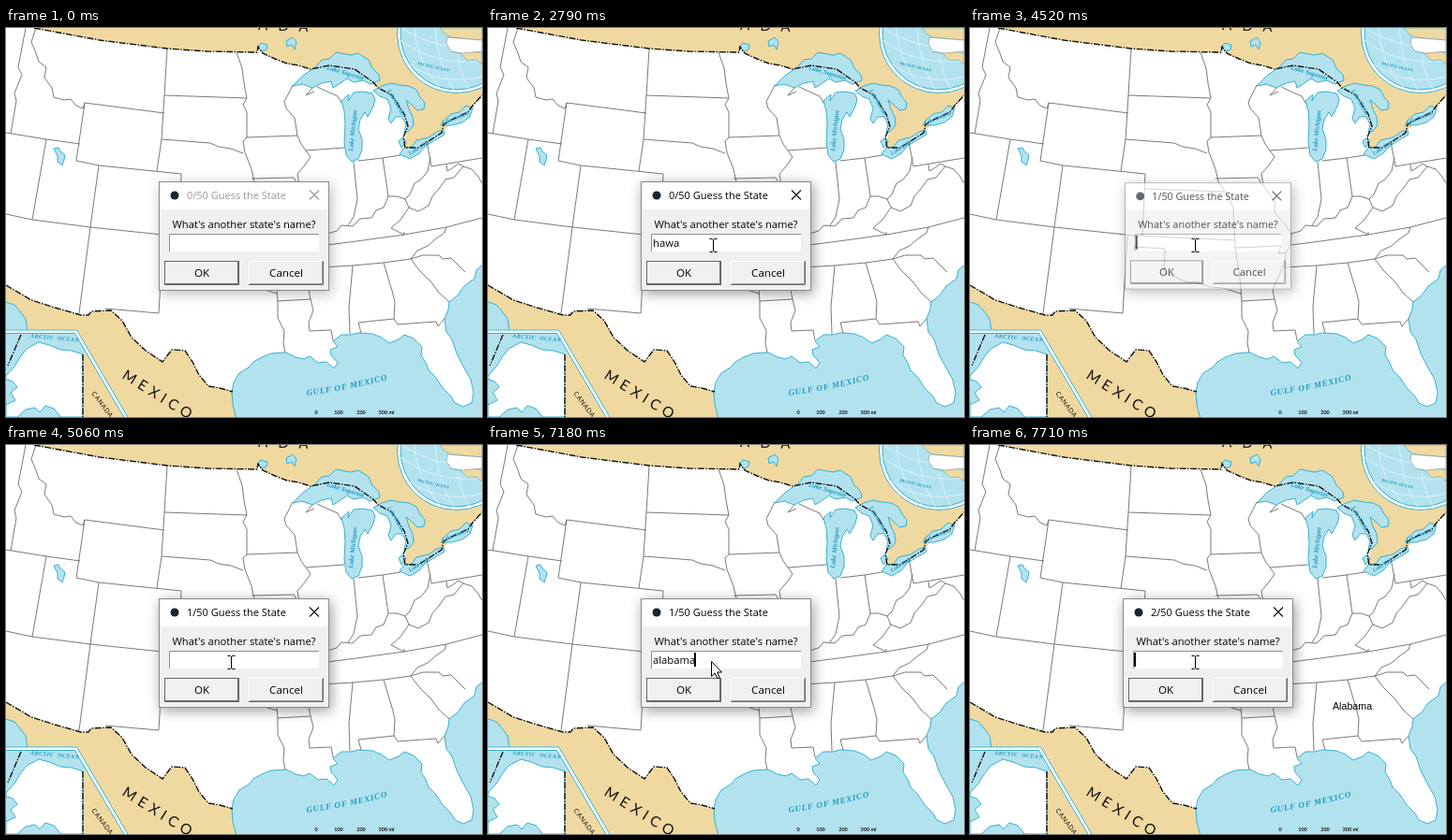
These frames come from a looping animation (508 by 416 pixels, 8000 ms). An HTML page:

```html
<!DOCTYPE html>
<html lang="en">
<head>
<meta charset="utf-8">
<title>Guess the State</title>
<style>
html, body { margin: 0; width: 100%; height: 100%; overflow: hidden; background: #fff; }
svg { display: block; }
.tan { fill: #f0d9a0; }
.sea { fill: #b3e2ef; stroke: #35b0cf; stroke-width: 1; stroke-linejoin: round; }
.line { fill: none; stroke: #6a6a6a; stroke-width: .9; stroke-linejoin: round; }
.border { fill: none; stroke: #111; stroke-width: 1.4; stroke-dasharray: 7 1.5 1.5 1.5; }
.frame { fill: none; stroke: #35b0cf; stroke-width: 1; }
.water { font: italic bold 6px "Liberation Serif", serif; fill: #1a9cc0; }
.place { font-family: Lato, sans-serif; fill: #111; }
.ui { font-family: "Open Sans", "Noto Sans", sans-serif; fill: #000; }
</style>
</head>
<body>
<svg width="508" height="416" viewBox="0 0 508 416">
  <rect width="508" height="416" fill="#fff"/>

  <!-- neighbours -->
  <path class="tan" d="M30 0 100 13 172 22 215 25 268 26 269 20 274 27 287 33 300 38 312 40 325 44 345 40 372 44 392 60 412 72 425 92 429 105 424 128 440 128 465 112 478 98 493 90 508 72V0Z"/>
  <path class="tan" d="M0 275 27 291 52 299 80 307 88 307 91 303 112 302 124 313 134 331 149 345 167 357 177 344 191 345 199 357 206 371 216 383 228 385 242 389 250 418H0Z"/>

  <!-- seas and lakes -->
  <path class="sea" d="M0 293 9 296 15 303 21 311 23 325H-2V293Z"/>
  <path class="sea" d="M246 418 242 403 241 389 243 379 249 369 259 363 264 357 273 352 283 348 299 347 309 352 318 354 324 351 333 358 342 357 350 364 354 358 347 350 346 344 354 341 349 335 358 328 368 328 376 326 391 327 401 331 409 337 419 333 425 328 435 332 444 341 443 350 448 358 451 366 459 374 466 385 475 394 479 401 488 405 497 401 499 390 496 376 487 360 481 348 476 333 470 325 468 311 472 301 473 293 482 286 489 276 500 268 502 259 510 252V418Z"/>
  <path class="sea" d="M306 62 318 50 330 42 337 34 345 33 352 26 368 29 376 27 387 34 391 43 398 50 399 56 389 60 381 56 371 58 364 54 354 61 349 64 347 57 337 59 327 64 316 60Z"/>
  <path class="sea" d="M358 78 361 89 362 104 361 122 363 136 369 143 376 140 380 130 380 119 376 108 378 98 383 90 386 95 392 84 394 76 391 70 381 68 371 69 365 78 366 71Z"/>
  <path class="sea" d="M392 67 401 62 411 59 420 61 430 62 438 66 442 74 447 80 446 87 439 88 433 82 427 77 430 87 434 95 435 104 430 110 425 112 427 103 423 95 416 95 411 102 408 97 411 86 407 76 399 73Z"/>
  <path class="sea" d="M420 135 425 128 433 127 438 120 451 117 460 111 467 109 468 114 456 121 448 126 441 134 431 140Z"/>
  <path class="sea" d="M464 104 468 98 475 92 484 90 491 83 498 86 495 95 487 101 476 104Z"/>
  <path class="sea" d="M422 128 419 121 424 117 427 122Z"/>
  <path class="sea" d="M51 129 56 128 58 132 63 136 62 141 60 147 55 143 55 137Z"/>
  <path class="sea" d="M299 14 306 10 310 15 308 23 305 18 300 20Z"/>
  <path class="sea" d="M268 21 272 16 279 18 278 23 273 25Z"/>

  <!-- western states -->
  <path class="line" d="M21 0 13 42 17 50 9 70 11 78 5 113M32 0 27 15 32 27 35 36 43 42 41 53 49 64 51 74 62 77 69 76 75 83 82 86 84 80 169 91M84 80 75 142M0 112 43 119 79 124M43 119 28 205M75 142 99 147 187 156M99 147 90 213 78 305M0 199 28 205 90 213 176 222 283 227M106 300 163 305 168 222"/>
  <path class="line" d="M172 22 169 72 166 119 161 153M169 72 257 75M166 119 218 123 227 127 240 129 253 134M187 156 184 222M187 172 271 175M175 234 208 236 207 262 219 266 231 272 243 272 256 277 270 278 289 284M246 26 252 43 254 59 257 75 253 82 257 90 257 117 253 121 255 133 262 151 265 164 277 182 281 193 283 235 288 267 290 292 290 310 297 324 296 337 298 347"/>

  <!-- central states -->
  <path class="line" d="M257 117 311 115M262 161 307 160 312 168M306 61 301 71 297 79 299 86 308 96 311 115 315 124 320 131 325 138 318 148 311 156 313 168 321 179 326 186 325 197 336 210 343 220 342 232 337 241 335 253 329 267 323 280 325 290 328 302 323 315 324 324 347 323 349 334M320 131 361 128M332 63 345 69 354 73 358 80M327 64 320 72 329 68"/>
  <path class="line" d="M283 235 332 233 329 241 338 240M290 292 325 290M343 232 374 228 425 221 470 213 508 203M336 256 370 254 403 251 432 247M370 254 366 298 367 327M403 251 412 281 415 293 414 311 376 315 379 326M414 311 418 317 459 314 461 319 468 311"/>

  <!-- eastern states -->
  <path class="line" d="M371 143 375 183 371 202 365 211M376 142 402 139 421 136M402 139 408 180M449 121 454 148 508 139M453 138 450 153 443 162 436 166 431 178 426 183 417 180 408 180 403 192 395 195 390 203 378 204 370 212 358 211 353 217 343 220"/>
  <path class="line" d="M426 183 430 192 440 196 451 190 455 180 462 172 469 162 478 160 488 148 483 145 476 150 471 153 470 146M430 192 421 205 411 214 425 221 425 218M488 148 497 151 504 159 508 166M432 247 439 238 450 233 458 226 468 219 470 213M432 247 445 243 462 243 466 247 475 246 490 261M432 247 441 259 454 272 462 283 473 293"/>

  <!-- national borders -->
  <path class="border" d="M30 0 100 13 172 22 215 25 268 26 269 20 274 27 287 33 300 38 312 40 325 44 345 40 372 44 392 58 397 64 412 72 425 92 429 105 424 117 426 128 440 128 465 112 467 103 478 97 493 90 498 83 508 72"/>
  <path class="border" d="M0 275 27 291 52 299 80 307 88 307 91 303 112 302 124 313 134 331 149 345 167 357 177 344 191 345 199 357 206 371 216 383 228 385 242 389"/>

  <!-- northern inset -->
  <path class="sea" stroke="none" d="M-2 326H74L88 350 128 418H-2Z"/>
  <path class="tan" d="M82 348 92 350 130 416H83Z"/>
  <path d="M0 372 9 362 15 352 22 343 35 336 46 339 58 344 70 345 82 349V416H0Z" fill="#fff" stroke="#35b0cf"/>
  <path class="sea" d="M-2 375 7 378 12 384 5 390 10 398 0 403ZM10 418 21 408 31 406 36 411 42 404 51 407 60 418Z"/>
  <path class="border" d="M82 349V416M16 328 2 361"/>
  <path d="M0 324.5H74.5L129 418" fill="none" stroke="#fff" stroke-width="4"/>
  <path class="frame" d="M0 323H75.500L131 418M0 326.500H73.500L127 418"/>

  <!-- globe -->
  <circle cx="481" cy="6" r="63.500" fill="#fff" stroke="#35b0cf"/>
  <circle class="sea" cx="481" cy="6" r="60"/>
  <g fill="none" stroke="#e4f5fa" stroke-width=".8">
    <path d="M421 13Q465 48 540 30M431 39Q470 67 526 47M422 0Q460 25 508 20"/>
    <path d="M436 0Q437 35 463 64M458 0Q460 37 478 67M482 30Q486 52 494 65"/>
  </g>
  <path class="tan" stroke="#35b0cf" stroke-width=".6" d="M463 0 469 7 475 10 508 13V0ZM475 25 485 27 493 35 502 34 508 39V27L492 23Z"/>
  <path d="M471 10 508 13V25L496 26 487 27 475 25 470 17Z" fill="#fff" stroke="#888" stroke-width=".6"/>

  <!-- map lettering -->
  <g class="place">
    <text transform="translate(123 374) rotate(32)" font-size="15.500" letter-spacing="4.800">MEXICO</text>
    <text transform="translate(91 391) rotate(53)" font-size="7" letter-spacing=".6">CANADA</text>
    <text transform="translate(269 2) rotate(2)" font-size="15" letter-spacing="11">ADA</text>
    <g font-size="5.500" font-weight="bold" text-anchor="middle">
      <text x="331" y="413">0</text><text x="355" y="413">100</text>
      <text x="379" y="413">200</text><text x="406" y="413">300 mi</text>
    </g>
  </g>
  <g class="water">
    <path id="gulf" d="M321 393Q362 388 407 376" fill="none"/>
    <text font-size="9" letter-spacing=".8"><textPath href="#gulf">GULF OF MEXICO</textPath></text>
    <text transform="translate(26 331) rotate(5)" letter-spacing=".5">ARCTIC&#160; OCEAN</text>
    <text transform="translate(439 39) rotate(13)" font-size="4.500">PACIFIC OCEAN</text>
    <text transform="translate(342 44) rotate(17)" font-size="7">Lake Superior</text>
    <text transform="translate(370 132) rotate(-84)" font-size="7">Lake Michigan</text>
    <text transform="translate(407 67) rotate(60)">Lake Huron</text>
    <text transform="translate(431 136) rotate(-31)">Lake Erie</text>
    <text transform="translate(466 103) rotate(-20)" font-size="5.500">Lake Ontario</text>
  </g>
  <text id="guess" x="387" y="283" font-family="'Liberation Sans', Arial, sans-serif" font-size="10.670">Alabama</text>

  <!-- dialog -->
  <g id="dialog">
    <rect id="panel" x="163" y="164" width="182" height="117" fill="#f0f0f0"/>
    <rect x="163.500" y="164.500" width="181" height="116" fill="#f0f0f0" stroke="#8a8a8a"/>
    <rect x="164" y="165" width="180" height="29" fill="#fff"/>
    <circle cx="180" cy="179" r="4.500" fill="#17242e"/>
    <text id="title" class="ui" x="193" y="183" font-size="11"></text>
    <path id="close" d="M324 173.500 334 183.500M334 173.500 324 183.500" stroke-width="1.100"/>
    <text class="ui" x="177.500" y="214" font-size="11.200">What's another state's name?</text>
    <rect x="174" y="220" width="160" height="19" fill="#fff"/>
    <path d="M174.500 239V220.500H334" fill="none" stroke="#8c8c8c"/>
    <rect x="169.500" y="249.500" width="79" height="25" fill="#f0f0f0" stroke="#646464"/>
    <path d="M171 273V251H247" fill="none" stroke="#fff"/>
    <path d="M170 273.500H247.500V250" fill="none" stroke="#696969"/>
    <path d="M259.500 274V249.500H338" fill="none" stroke="#fff"/>
    <path d="M259 274.500H338.500V249" fill="none" stroke="#696969"/>
    <path d="M260 273.500H337.500V250" fill="none" stroke="#a0a0a0"/>
    <g class="ui" text-anchor="middle" font-size="11.600">
      <text x="209" y="266">OK</text><text x="299" y="266">Cancel</text>
    </g>
    <text id="entry" class="ui" x="176" y="234" font-size="11.250"></text>
    <rect id="caret" y="222" width="2" height="15"/>
  </g>

  <circle id="click" cx="238" cy="231" r="12" fill="#ff0" fill-opacity=".47"/>
  <path id="arrow" d="M.5 .5V16.500L4.200 13 6.800 18.700 9.200 17.700 6.700 12H11.500Z" fill="#fff" stroke="#000"/>
  <path id="beam" d="M236.500 225.500H239.500L240.500 226.500 241.500 225.500H244.500M240.500 226V239M236.500 239.500H239.500L240.500 238.500 241.500 239.500H244.500" fill="none" stroke="#000"/>
</svg>
<script>
const LOOP = 8000;
const $ = id => document.getElementById(id);
const show = (el, on) => el.setAttribute('visibility', on ? 'visible' : 'hidden');
const within = (t, a, b) => t >= a && t < b;

// Every row: start time, then the values held until the next row.
const fadeOut = t => [[t, 1, 1], [t + 70, .6, .97], [t + 130, .2, .94], [t + 200, 0, .94]];
const fadeIn = t => [[t, .3, .945], [t + 60, .67, .978], [t + 130, .9, .992], [t + 200, .98, .998], [t + 260, 1, 1]];
const windowSteps = [[0, 1, 1], ...fadeOut(3860), ...fadeIn(4460), ...fadeOut(7180), ...fadeIn(7450)];

const titles = [[0, 0], [4460, 1], [7450, 2]];

const typed = (word, times) => times.map((t, i) => [t, word.slice(0, i + 1)]);
const entries = [
  [0, ''],
  ...typed('hawaii', [1790, 1990, 2660, 2790, 3130, 3260]),
  [4460, ''],
  ...typed('alabama', [6050, 6250, 6380, 6580, 6720, 6850, 6980]),
  [7450, '']
];

// The caret toggles at each of these times.
const blinks = [1130, 1730, 1790, 1990, 2060, 2590, 2660, 2790, 2930, 3260, 3530, 5060, 5320, 5980, 6050];

const pointer = [
  [0, -30, -30], [460, 349, 323], [530, 316, 295], [590, 277, 262],
  [660, 250, 240], [720, 238, 231]
];

function at(rows, t) {
  let row = rows[0];
  for (const r of rows) if (r[0] <= t) row = r;
  return row;
}

function draw(t) {
  const active = t >= 1130;
  const [, alpha, size] = at(windowSteps, t);
  $('dialog').setAttribute('opacity', alpha);
  $('dialog').setAttribute('transform', `translate(254 222.5) scale(${size}) translate(-254 -222.5)`);
  $('panel').style.filter = `drop-shadow(2px 3px 7px rgba(0,0,0,${active ? .4 : .27}))`;

  $('title').textContent = at(titles, t)[1] + '/50 Guess the State';
  $('title').style.fill = active ? '#000' : '#999';
  const closing = within(t, 3860, 4460) || within(t, 7180, 7450);
  $('close').setAttribute('stroke', active ? '#111' : '#999');
  show($('close'), !closing);

  $('entry').textContent = at(entries, t)[1];
  $('caret').setAttribute('x', Math.round(175 + $('entry').getComputedTextLength()));
  show($('caret'), blinks.filter(b => b <= t).length % 2);

  show($('guess'), t >= 7380);
  show($('click'), within(t, 1130, 1330) || within(t, 5520, 5720));

  const [, x, y] = at(pointer, t);
  const beam = t >= 720 && !closing;
  show($('beam'), beam);
  show($('arrow'), !beam);
  $('arrow').setAttribute('transform', `translate(${x} ${y})`);
}

function tick() {
  draw(performance.now() % LOOP);
  requestAnimationFrame(tick);
}
tick();
</script>
</body>
</html>
```
